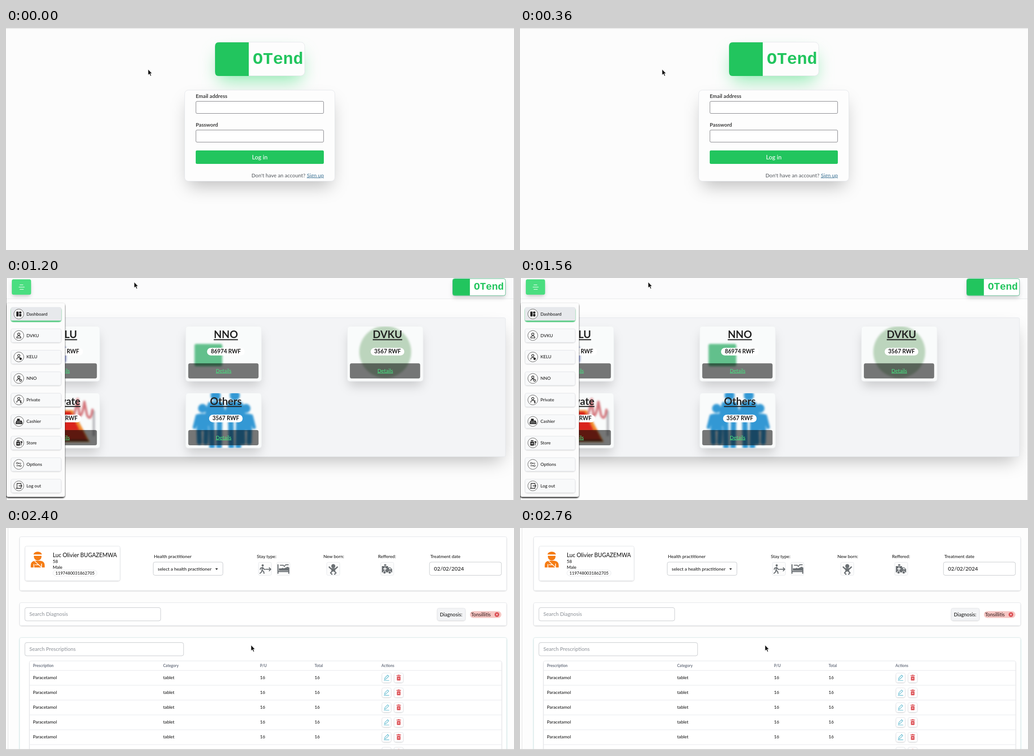
These frames come from a looping animation (1130x495 px, 3000 ms). An HTML page:

```html
<!DOCTYPE html>
<html lang="en">
<head>
<meta charset="utf-8">
<title>Clinic billing tour</title>
<style>
html, body { margin: 0; width: 100%; height: 100%; overflow: hidden; background: #fdfdfd; }
svg { display: block; width: 1130px; height: 495px; }
text { font-family: Lato, "Open Sans", sans-serif; font-weight: 500; white-space: pre; }
.mono { font-family: "Liberation Mono", "Courier New", monospace; }
.blur { filter: blur(2.2px); }
.line { fill: none; stroke-linecap: round; stroke-linejoin: round; }
</style>
</head>
<body>
<svg id="stage" viewBox="0 0 1130 495"></svg>
<script>
const GREEN = '#22c55e', LIME = '#4ade80', GREY = '#6b7280', EDGE = '#e5e7eb', INK = '#1c1c1c';
const BRAND = 'OTend', PLANS = { a: 'KELU', b: 'NNO', c: 'DVKU' };

// Drawing helpers: each returns SVG markup
const rect = (x, y, w, h, r, fill, more = '') =>
  `<rect x="${x}" y="${y}" width="${w}" height="${h}" rx="${r}" fill="${fill}" ${more}/>`;
const frame = (x, y, w, h, r = 3, fill = '#fff', stroke = EDGE) =>
  rect(x + .5, y + .5, w - 1, h - 1, r, fill, `stroke="${stroke}"`);
const shadow = (x, y, w, h, dy, blur, spread, color) =>
  rect(x - spread, y - spread + dy, w + 2 * spread, h + 2 * spread, 5, color, `style="filter:blur(${blur / 2}px)"`);
const raised = (x, y, w, h, r = 3, fill = '#fff') =>
  shadow(x, y, w, h, 1, 2.5, 0, 'rgba(0,0,0,.16)') + frame(x, y, w, h, r, fill);
const text = (x, y, size, str, fill = INK, more = '') =>
  `<text x="${x}" y="${y}" font-size="${size}" fill="${fill}" ${more}>${str}</text>`;
const MID = ' text-anchor="middle"', END = ' text-anchor="end"';
const BOLD = ' style="font-weight:700"', BLACK = ' style="font-weight:900"', UNDER = ' text-decoration="underline"';
const circle = (x, y, r, fill, more = '') => `<circle cx="${x}" cy="${y}" r="${r}" fill="${fill}" ${more}/>`;
const path = (d, fill) => `<path d="${d}" fill="${fill}"/>`;
const line = (d, color, w = 1) => `<path class="line" d="${d}" stroke="${color}" stroke-width="${w}"/>`;
const at = (x, y, body, s = 1) => `<g transform="translate(${x} ${y}) scale(${s})">${body}</g>`;
const list = (n, f) => Array.from({ length: n }, (_, i) => f(i)).join('');

const cursor = (x, y) => at(x, y,
  '<path d="M0 0V13L3 10.3L5.2 15.2L7.3 14.2L5.2 9.6H9Z" fill="#111" stroke="#fff" stroke-width=".8"/>');

const walker = c => circle(7, 2.5, 2.4, c) +
  line('M6.5 7L5.5 13L9 16L10 20M5.5 13L4.5 17L1 20M1.5 11L3 8L7 7L9.5 10.5L12 11.5', c, 2.3) +
  line('M14 11H25M21.5 7.5L25 11L21.5 14.5', c, 2);
const ambulance = c => path('M0 4H14V7H19L23 11V18H0Z', c) + rect(5, 0, 5, 3, 1, c) +
  circle(6, 18, 3.2, c, 'stroke="#fff"') + circle(17.5, 18, 3.2, c, 'stroke="#fff"') +
  line('M7 7V13M4 10H10', '#fff', 1.8) + path('M16 8.5H18.5L21 11H16Z', '#fff');
const patient = () => {
  const c = '#f57c14';
  return path('M6 8A10 9 0 0 1 25 8Z', c) + path('M7 11H24V13A8.5 8.5 0 0 1 7 13Z', c) +
    path('M0 37V32Q0 23 10 22H21Q31 23 31 32V37Z', c) +
    line('M6 9.5H25M9 23L23 36M7 30V37M24 29V37M10 31H18', '#fff', 1.6);
};
const patientCard = (x, y) =>
  text(x, y, 12.4, 'Luc Olivier BUGAZEMWA') + text(x, y + 13.8, 9.8, '58') + text(x, y + 26.6, 9.8, 'Male') +
  frame(x, y + 29, 99, 14, 7) + text(x + 6, y + 39.4, 9.4, '1197480031862705');
const diagnosis = (x, y) => raised(x, y, 63, 28, 3, '#f3f4f6') + text(x + 6, y + 18, 11.1, 'Diagnosis:');

function login() {
  const field = (y, label) => text(422, y - 7, 11.6, label, '#3c3c3c', BOLD) + frame(422, y, 285, 28, 2.5, '#fff', '#7b7b80');
  return rect(0, 0, 1130, 495, 0, '#fcfcfc') + rect(0, 0, 1130, 1.5, 0, '#e4e4e4') +
    shadow(464, 31, 201, 76, 19, 38, -9, 'rgba(74,222,128,.62)') +
    frame(464, 31, 201, 76, 9, '#fdfdfd') +
    path('M540 32H473Q465 32 465 41V98Q465 107 473 107H540Z', GREEN) +
    text(549, 80, 37.4, BRAND, GREEN, 'class="mono"' + BOLD) +
    shadow(397, 138, 335, 204, 19, 38, -9, 'rgba(0,0,0,.25)') +
    frame(397, 138, 335, 204, 8, '#fdfdfd') +
    field(163, 'Email address') + field(227, 'Password') +
    rect(422, 273, 285, 30, 3, GREEN) + text(564.5, 293, 13.2, 'Log in', '#fff', MID) +
    text(666, 332.5, 11.7, "Don't have an account?", '#5f6368', END) +
    text(707, 332.5, 11.7, 'Sign up', '#4a7d9c', END + UNDER) + cursor(316, 92);
}

// Blurred card pictures, relative to the card corner
const BLUE = '#3398d4';
const person = (x, y, feet, s) => at(x, y, circle(0, 0, 10, BLUE) +
  path('M-15 14Q0 9 15 14L12 50H-12Z', BLUE) + line('M-12 18L-18 42M12 18L18 42', BLUE, 8) +
  line(`M-8 45L-7 ${feet}M8 45L7 ${feet}`, BLUE, 11), s);
const pictures = {
  plain1: rect(10, 46, 84, 36, 5, '#6b77b8'),
  plain2: rect(20, 40, 62, 50, 4, '#62c08c'),
  plain3: circle(85, 58, 58, '#bcd5bd'),
  carpet: path('M67 39H109L147 110H24Z', '#f08a2c') + path('M72 42H104L124 84H48Z', '#d9231c') +
    path('M40 84H131L142 107H28Z', '#c63420') + line('M27 107H143', '#222', 2.5) +
    [1, -1].map(s => `<g transform="translate(85 0) scale(${s} 1)">` +
      line('M-71 42V95', '#b4b4b8', 5) +
      line('M-68 38Q-64 66 -56 50L-50 20Q-45 56 -39 50L-35 14Q-30 46 -24 52', '#d3747a', 5) + '</g>').join(''),
  people: person(38, 35, 76, 1) + person(135, 35, 76, 1) + person(67, 6, 105, 1.12) + person(110, 6, 105, 1.12)
};

function card(x, y, title, amount, picture) {
  const w = amount.length > 8 ? 84 : 75;
  return at(x, y, shadow(0, 0, 170, 124, 14, 24, -4, 'rgba(0,0,0,.17)') + rect(0, 0, 170, 124, 6, '#f9fbfb') +
    `<g clip-path="url(#card)"><g class="blur">${pictures[picture]}</g></g>` +
    frame(0, 0, 170, 124, 6, 'none', '#eceef0') +
    text(90, 27.5, 23, title, '#222', MID + BOLD + UNDER) +
    rect(90 - w / 2, 49, w, 17, 8.5, '#fff') + text(90, 61.5, 12.4, amount, '#181818', MID + BOLD) +
    rect(6, 83.5, 157, 34, 4, 'rgba(0,0,0,.53)') + text(85, 104, 11.4, 'Details', LIME, MID + UNDER));
}

const dashboard = () => rect(-5, -5, 1145, 510, 0, '#fdfdfd') +
  rect(0, 2, 1140, 51, 0, '#fbfbfc') + rect(0, 1, 1140, 1, 0, EDGE) + rect(0, 53, 1140, 1, 0, EDGE) +
  shadow(13, 10, 43, 34, 5, 9, -1, 'rgba(0,0,0,.2)') + rect(13, 10, 43, 34.5, 4, LIME) +
  line('M31 22.5H38M29 27.5H41M31 32.5H39', '#e9fbef', 1.2) +
  shadow(997, 8, 119, 39, 6, 10, -1, 'rgba(0,0,0,.16)') + frame(997, 8, 119, 39, 4, '#fff', '#55b98a') +
  path('M1036 9H1002Q998 9 998 13V42Q998 46 1002 46H1036Z', GREEN) +
  text(1045, 33, 22.3, BRAND, GREEN, 'class="mono"' + BOLD) +
  shadow(19, 96, 1097, 311, 19, 38, -9, 'rgba(0,0,0,.25)') + frame(19, 95.5, 1097, 312, 3, '#f3f4f6') +
  card(40, 114.5, PLANS.a, '45872 RWF', 'plain1') + card(401, 114.5, PLANS.b, '86974 RWF', 'plain2') +
  card(762, 114.5, PLANS.c, '3567 RWF', 'plain3') +
  card(40, 264, 'Private', '3567 RWF', 'carpet') + card(401, 264, 'Others', '3567 RWF', 'people');

const home = () => dashboard() + rect(0, 0, 1, 495, 0, '#9a9a9a') + cursor(107, 38);

function menu() {
  const k = '#222', user = circle(0, -3, 2.5, 'none', `stroke="${k}" stroke-width="1.3"`) + line('M-4.5 5.5Q-4.5 1 0 1Q4.5 1 4.5 5.5', k, 1.3);
  const items = [
    ['Dashboard', rect(-5.5, -5.5, 5, 11, 1, k) + rect(.7, -5.5, 5, 4.5, 1, k) + rect(.7, 0, 5, 5.5, 1, k)],
    [PLANS.c, user + line('M-4.5 5.5H4.5', k, 1.3)],
    [PLANS.a, user + circle(4, 4, 2.6, k)],
    [PLANS.b, user + circle(4, 4, 2.2, '#fff', `stroke="${k}" stroke-width="1.3"`)],
    ['Private', user + text(2, 7, 8, '$', k, BOLD)],
    ['Cashier', path('M-7 6V2L-5 -2H-4V-6H2V-2H6L8 2V6Z', k) + line('M-4 0H4M-5 3H6', '#fff', .8)],
    ['Store', rect(-5.5, -3, 8, 9, 1, k) + rect(-4.5, -6, 6, 2, 0, k) + line('M-3.5 1.5H.5M-1.5 -.5V3.5', '#fff', 1) + line('M5 -3V5M4 -3H7V0', k, 1.5)],
    ['Options', circle(-3.5, -2.5, 2, 'none', `stroke="${k}"`) + circle(3.5, 3, 2, 'none', `stroke="${k}"`) + line('M-1 -2.5H5M1 3H-5', k, 1.2)],
    ['Log out', line('M1 -5.5H-4V5.5M-6 5.5H5V2M5 -2V-5.5H1M0 0H7M5 -2L7 0L5 2', k, 1.3)]
  ];
  return at(0, -7, dashboard(), .996) + rect(0, 0, 1, 495, 0, '#9a9a9a') + rect(1129, 0, 1, 495, 0, '#c4c4c4') +
    shadow(0, 56, 131, 433, 1.5, 3, 0, 'rgba(0,0,0,.85)') + rect(1, 56, 130, 432, 4, '#fcfcfc') +
    items.map(([label, icon], i) => {
      const y = 65 + i * 47.9;
      return (i ? '' : shadow(11, y, 112, 31, 2, 2, 0, '#3fcf75')) + raised(11, y, 112, 31, 3, i ? '#f8f9fa' : '#e7e9ec') +
        (i ? '' : rect(12, y + 30, 110, 1.5, 0, '#57cf85')) +
        circle(28.5, y + 15.3, 11, '#fff', 'stroke="#555"') + at(28.5, y + 15.3, icon) + text(45.5, y + 18.6, 9.8, label);
    }).join('') + cursor(285, 9);
}

function invoice() {
  const cols = [41, 111.5, 619, 764.5, 960];
  const rows = [
    ['Polyethylene Glycol 3350', 59, 50, 54],
    ['Alcohol Prep Swab with Pain Relief', 96, 28, 37],
    ['Clozapine', 88, 25, 16],
    ['Hydroxyzine Hydrochloride', 50, 2, 61],
    ['Misty Lakeside KIDS Broad Spectrum SPF 30', 71, 80, 53],
    ['Hydrocodone Bitartrate and Acetaminophen', 80, 31, 55]
  ];
  const tags = [[114, 51, 'Tonsillitis'], [172, 52, 'Amibiasis'], [231, 109, 'Urinary tract infection'], [347, 114, 'All fever cases received']];
  const doctor = (y, name, icon) => frame(955, y, 126, 19, 3, '#f3f4f6') + at(960, y + 4, icon) + text(974, y + 13.3, 9.6, name);
  return rect(0, 0, 1130, 495, 0, '#fdfdfd') + raised(4, -8, 1115, 520, 4) +
    raised(30, 26, 1062, 87) + raised(41, 37, 118, 65) + text(47, 54.5, 11.2, 'Status', GREY) +
    text(48, 80, 23, '15484511', '#5fc889', BLACK) +
    rect(47, 84, 50, 13, 6.5, '#3ccb95') + text(72, 93.6, 8.6, 'Submitted', '#174a38', MID) +
    shadow(1037, 54, 44, 31, 1, 3, 0, 'rgba(0,0,0,.3)') + frame(1037, 54, 44, 31, 4, '#f87171', '#ec6767') +
    text(1059, 73, 9.7, 'Close', '#281414', MID + BOLD) +
    shadow(30, 139, 1062, 90, 1.5, 4, 0, 'rgba(74,222,128,.85)') + frame(30, 139, 1062, 90, 3, '#fff', '#dfece4') +
    raised(41, 150, 202, 68) + at(49, 155, patient()) + patientCard(98, 169) +
    circle(599, 184, 25, '#fff', `stroke="${EDGE}"`) + at(586, 174, walker('#3dba70')) + at(613, 200, ambulance('#d9201c')) +
    text(955, 162.5, 11.5, '25/12/2023') +
    doctor(176, 'KAVOZERWI Celestine', circle(5, 3, 2.8, '#2799b5') + path('M0 12Q0 6 5 6Q11 6 11 12Z', '#2799b5')) +
    doctor(198, 'RUGOMBWE Alain', line('M3 1H11V8H6', '#2fa866', 1.4) + circle(2.5, 5, 2, '#2fa866') + path('M-1 11Q-1 7 3 7.5Q6 8 6 11Z', '#2fa866')) +
    raised(30, 239, 1062, 37) + diagnosis(41, 244) +
    tags.map(([x, w, s]) => rect(x, 252, w, 13.5, 6.7, '#f4ccc8') + text(x + w / 2, 262, 9.9, s, '#3b2323', MID)).join('') +
    raised(30, 303, 1062, 220) +
    ['', 'Prescription', 'Total items', 'Unit price (RWF)', 'Cost(RWF)'].map((s, i) => text(cols[i], 319, 8.5, s, GREY, BOLD)).join('') +
    rows.map((r, i) => rect(31, 328 + i * 28.9, 1060, 1, 0, EDGE) +
      [i + 1, ...r].map((s, j) => text(cols[j], 346 + i * 28.85, 9.9, s)).join('')).join('') + cursor(353, 212);
}

function visit() {
  const cols = [60, 349.5, 565, 686.5, 835], c = '#6b7074';
  const input = (x, y, w, s, color, size = 11.5) => frame(x, y, w, 30.5, 4, '#fff', '#c3c6ca') + text(x + 10.5, y + 19, size, s, color);
  const tile = (x, icon) => frame(x, 76, 30, 30, 3, '#fcfcfc') + at(x + 3, 81, icon);
  const bed = line('M0 1V20M0 16H24M24 20V8', c, 2.4) + path('M2 9H8Q10 7 13 9L23 5V14H2Z', c) + line('M5 2H12L14 5L17 1H23', c, 1.8);
  const baby = circle(12, 5, 4.5, c) + line('M3 7L7 11H17L21 7', c, 3) + path('M7 10H17L16 17H8Z', c) + line('M9 17L6 20L9 23M15 17L18 20L15 23', c, 2.6);
  const actions = y => raised(836, y, 21, 22) + line(`M842 ${y + 15}L843 ${y + 11}L849 ${y + 5}L851.5 ${y + 7.5}L845.5 ${y + 13.5}ZM841 ${y + 17}H852`, '#55b5cc', 1.1) +
    raised(863, y, 21, 22) + rect(869.5, y + 8, 8, 9, 1, '#dc5055') + line(`M869 ${y + 6}H878M872 ${y + 5}H875`, '#dc5055', 1.6) +
    line(`M872 ${y + 11}L875 ${y + 14}M875 ${y + 11}L872 ${y + 14}`, '#fff', 1);
  return rect(0, 0, 1130, 495, 0, '#fdfdfd') + rect(4, 0, 1, 495, 0, '#e2e2e2') +
    raised(30, 19, 1084, 121) + raised(42, 40, 212, 78) + at(55, 51, patient()) + patientCard(104, 64.5) +
    [[329, 'Health practitioner'], [558, 'Stay type:'], [706, 'New born:'], [827.5, 'Reffered:'], [944, 'Treatment date']]
      .map(([x, s]) => text(x, 67, 10, s)).join('') +
    input(327, 75.5, 156, 'select a health practitioner', INK, 10.2) + path('M465.5 90H471.5L468.5 93.5Z', '#222') +
    tile(561, walker(c)) + tile(602, bed) + tile(713, at(0, -1, baby)) + tile(833, ambulance(c)) +
    input(941.5, 75.5, 161, '02/02/2024', INK, 12) +
    raised(30, 166, 1084, 52) + input(41.5, 177, 303, 'Search Diagnosis', '#94989e') +
    diagnosis(959, 178.5) + rect(1032, 185.5, 70, 15, 7.5, '#f6c6c3') + text(1034.5, 196.5, 10.8, 'Tonsillitis', '#3b2323') +
    circle(1092, 193, 5.2, '#dc5055') + line('M1090.3 191.3L1093.7 194.7M1093.7 191.3L1090.3 194.7', '#fff', 1) +
    shadow(30, 244, 1084, 270, 1, 3, 0, 'rgba(60,170,170,.35)') + frame(30, 244, 1084, 270, 3, '#fff', '#dfeaea') +
    input(41.5, 255, 354, 'Search Prescriptions', '#94989e') +
    raised(52, 296, 1051, 230) +
    ['Prescription', 'Category', 'P/U', 'Total', 'Actions'].map((s, i) => text(cols[i], 310, 8.5, s, GREY, BOLD)).join('') +
    list(6, i => rect(53, 317 + i * 33.1, 1049, 1, 0, EDGE) + actions(323 + i * 33.1) +
      ['Paracetamol', 'tablet', 16, 16].map((s, j) => text(cols[j], 336.5 + i * 33.1, 9.8, s)).join('')) +
    rect(0, 493, 1130, 2, 0, '#d2d2d2') + cursor(545, 261);
}

const stage = document.getElementById('stage');
stage.innerHTML = '<defs><clipPath id="card"><rect width="170" height="124" rx="6"/></clipPath></defs>' +
  [login, home, menu, invoice, visit].map(f => `<g class="scene">${f()}</g>`).join('');
const scenes = [...stage.querySelectorAll('.scene')];

const HOLD = 600, start = performance.now();
function show(now) {
  const current = Math.floor(Math.max(0, now - start) / HOLD) % scenes.length;
  scenes.forEach((s, i) => { s.style.display = i === current ? '' : 'none'; });
  requestAnimationFrame(show);
}
show(start);
</script>
</body>
</html>
```
